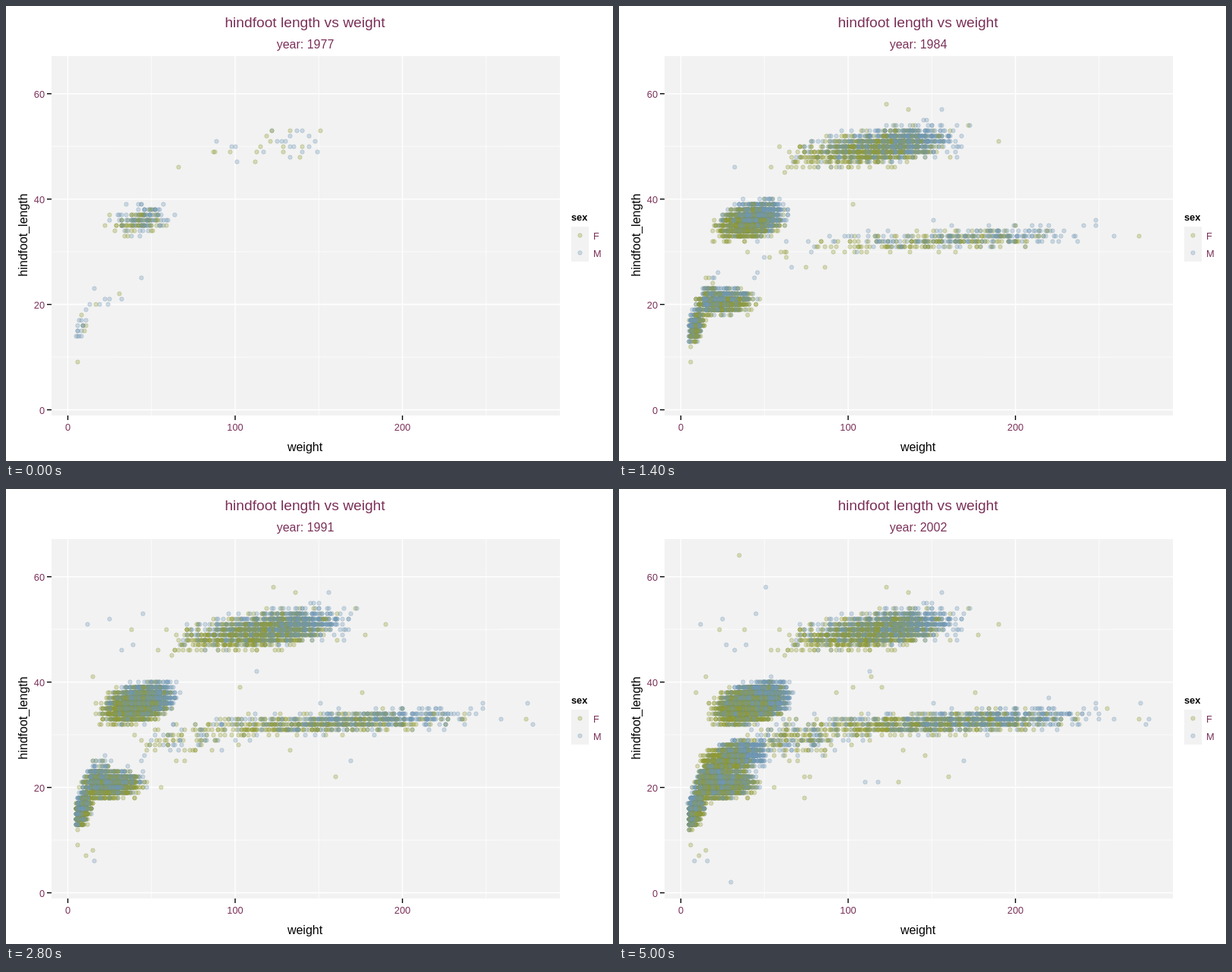
Animation of 800 by 600 pixels, one loop 5.2 s. Source, as an HTML page with a canvas:

```html
<!DOCTYPE html>
<html lang="en">
<head>
<meta charset="utf-8">
<title>hindfoot length vs weight</title>
<style>
  html, body { margin: 0; width: 100%; height: 100%; overflow: hidden; background: #fff; }
  canvas { display: block; }
</style>
</head>
<body>
<canvas id="chart" width="800" height="600"></canvas>
<script>
const ctx = document.getElementById('chart').getContext('2d');
const FIRST_YEAR = 1977, YEARS = 26, STEP = 200;
const PURPLE = '#7b3058', PANEL = '#f2f2f2';
const COLORS = { F: '#919a38', M: '#7099b4' };
const px = weight => 81.5 + weight * 2.205;
const py = length => 532.5 - length * 6.947;

// Last year of each period; `perYear` below gives the dots added per year in it.
const PERIODS = [1977, 1980, 1984, 1987, 1991, 1998, 2002];

// w: mean weight, sd: spread, left: stretch of the light side,
// h: mean hindfoot length, slope: growth with weight, hsd: spread of length
const GROUPS = [
  { w: { F: 41.5, M: 44.5 }, sd: 7.2, left: 1.1, h: 35.7, slope: .06, hsd: 1.25, perYear: [180, 400, 400, 380, 450, 500, 560] },
  { w: { F: 117, M: 128 }, sd: 15, left: 1.5, h: 49.7, slope: .035, hsd: 1.35, perYear: [33, 270, 220, 90, 35, 8, 3] },
  { w: { F: 155, M: 172 }, sd: 32, left: 1.2, h: 32.1, slope: .014, hsd: .9, perYear: [0, 30, 80, 75, 60, 35, 45] },
  { w: { F: 68, M: 68 }, sd: 15, left: .9, h: 28.8, slope: .03, hsd: 1.6, perYear: [0, 1, 2, 4, 14, 12, 14] },
  { w: { F: 8.8, M: 8.4 }, sd: 2, left: .75, h: 15.7, slope: .3, hsd: 1.1, perYear: [18, 55, 130, 60, 300, 130, 60] },
  { w: { F: 25, M: 24.5 }, sd: 7.5, left: .8, h: 20.2, slope: .035, hsd: .9, perYear: [8, 150, 230, 150, 180, 130, 130] },
  { w: { F: 17, M: 17.5 }, sd: 3.7, left: .7, h: 21.4, slope: .13, hsd: 1.15, perYear: [1, 12, 25, 25, 75, 250, 280] },
  { w: { F: 29, M: 36 }, sd: 5.6, left: 1.2, h: 25.4, slope: .05, hsd: 1.1, perYear: [0, 0, 0, 0, 0, 50, 540] }
];

// Lone dots as [weight, length]
const STRAYS = {
  1977: { F: [[6, 9], [122, 53]], M: [[44, 25], [137, 53], [149, 49]] },
  1979: { F: [[123, 58], [274, 33]], M: [[32, 46], [66, 27], [22, 26], [241, 35], [151, 36]] },
  1982: { F: [[190, 51], [103, 39], [136, 57], [172, 54]], M: [[156, 57], [248, 36], [259, 33]] },
  1986: { F: [[178, 49], [133, 27], [56, 20]], M: [[12, 51], [16, 6], [169, 25], [278, 32], [39, 47]] },
  1990: { F: [[15, 41], [38, 50], [160, 22], [11, 7], [15, 8], [176, 38]], M: [[25, 52], [45, 53], [275, 36], [113, 42]] },
  1995: { F: [[23, 50], [9, 38], [114, 41], [93, 38], [120, 39], [130, 21], [74, 18], [77, 22]],
          M: [[51, 58], [110, 21], [118, 21], [8, 6], [220, 37]] },
  2000: { F: [[35, 64], [146, 26], [74, 22]], M: [[30, 2], [280, 33], [27, 47]] }
};

function seededRandom(seed) {
  return () => {
    seed = (seed + 0x6D2B79F5) | 0;
    let t = Math.imul(seed ^ (seed >>> 15), 1 | seed);
    t = (t + Math.imul(t ^ (t >>> 7), 61 | t)) ^ t;
    return ((t ^ (t >>> 14)) >>> 0) / 4294967296;
  };
}

function makeDot(color) {
  const dot = document.createElement('canvas');
  dot.width = dot.height = 9;
  const c = dot.getContext('2d');
  c.globalAlpha = .31;
  c.fillStyle = c.strokeStyle = color;
  c.arc(4.5, 4.5, 2.7, 0, 7);
  c.fill();
  c.stroke();
  return dot;
}
const DOTS = { F: makeDot(COLORS.F), M: makeDot(COLORS.M) };

function drawDot(sex, x, y) {
  ctx.drawImage(DOTS[sex], Math.round(x - 4.5), Math.round(y - 4.5));
}

function yearDots(year) {
  const random = seededRandom(year * 7919);
  const bell = () => (random() + random() + random() + random() - 2) * 1.732;
  const period = PERIODS.findIndex(end => year <= end);
  const dots = [];
  for (const g of GROUPS) {
    for (let i = 0; i < g.perYear[period]; i++) {
      const sex = random() < .48 ? 'F' : 'M';
      const spread = bell();
      const weight = g.w[sex] + spread * g.sd * (spread < 0 ? g.left : 1);
      const length = g.h + (sex === 'M' ? .4 : 0) + (weight - g.w.F) * g.slope + bell() * g.hsd;
      dots.push({ sex, weight: Math.round(weight), length: Math.round(length), order: random() });
    }
  }
  for (const [sex, places] of Object.entries(STRAYS[year] || {})) {
    for (const [weight, length] of places) dots.push({ sex, weight, length, order: random() });
  }
  return dots.sort((a, b) => a.order - b.order);
}

function text(string, x, y, size, color, align = 'left', weight = '') {
  ctx.font = `${weight} ${size}px "Liberation Sans", Arial, sans-serif`;
  ctx.fillStyle = color;
  ctx.textAlign = align;
  ctx.fillText(string, x, y);
}

function line(x1, y1, x2, y2, width, color) {
  ctx.lineWidth = width;
  ctx.strokeStyle = color;
  ctx.beginPath();
  ctx.moveTo(x1, y1);
  ctx.lineTo(x2, y2);
  ctx.stroke();
}

function drawFrame() {
  ctx.fillStyle = '#fff';
  ctx.fillRect(0, 0, 800, 600);
  ctx.fillStyle = PANEL;
  ctx.fillRect(60, 66, 670, 474);
  ctx.fillRect(745, 291, 23, 46);

  for (const w of [50, 150, 250]) line(px(w), 66, px(w), 540, .7, '#fff');
  for (const h of [10, 30, 50]) line(60, py(h), 730, py(h), .7, '#fff');
  for (const w of [0, 100, 200]) {
    line(px(w), 66, px(w), 540, 1.4, '#fff');
    line(px(w), 540, px(w), 546, 1.4, '#000');
    text(w, px(w), 560, 12.8, PURPLE, 'center');
  }
  for (const h of [0, 20, 40, 60]) {
    line(60, py(h), 730, py(h), 1.4, '#fff');
    line(54, py(h), 60, py(h), 1.4, '#000');
    text(h, 51, py(h) + 5, 12.8, PURPLE, 'right');
  }

  text('hindfoot length vs weight', 394, 28, 19.2, PURPLE, 'center');
  text('weight', 394, 587, 16, '#000', 'center');
  ctx.save();
  ctx.translate(28, 302);
  ctx.rotate(-Math.PI / 2);
  text('hindfoot_length', 0, 0, 16, '#000', 'center');
  ctx.restore();

  text('sex', 745, 283, 12.8, '#000', 'left', 'bold');
  ['F', 'M'].forEach((sex, i) => {
    drawDot(sex, 756.5, 302.5 + 23 * i);
    text(sex, 774, 308 + 23 * i, 12.8, PURPLE);
  });
}

// Dots accumulate, so only the years not yet on the canvas are added.
let drawnYear = Infinity;

function render(time) {
  const year = FIRST_YEAR + Math.floor(time / STEP) % YEARS;
  if (year === drawnYear) return;
  if (year < drawnYear) {
    drawFrame();
    drawnYear = FIRST_YEAR - 1;
  }
  while (drawnYear < year) {
    drawnYear++;
    for (const d of yearDots(drawnYear)) drawDot(d.sex, px(d.weight), py(d.length));
  }
  ctx.fillStyle = '#fff';
  ctx.fillRect(300, 38, 200, 26);
  text('year: ' + year, 394.5, 56, 16, PURPLE, 'center');
}

const start = performance.now();
function tick() {
  render(performance.now() - start);
  requestAnimationFrame(tick);
}
tick();
</script>
</body>
</html>
```
